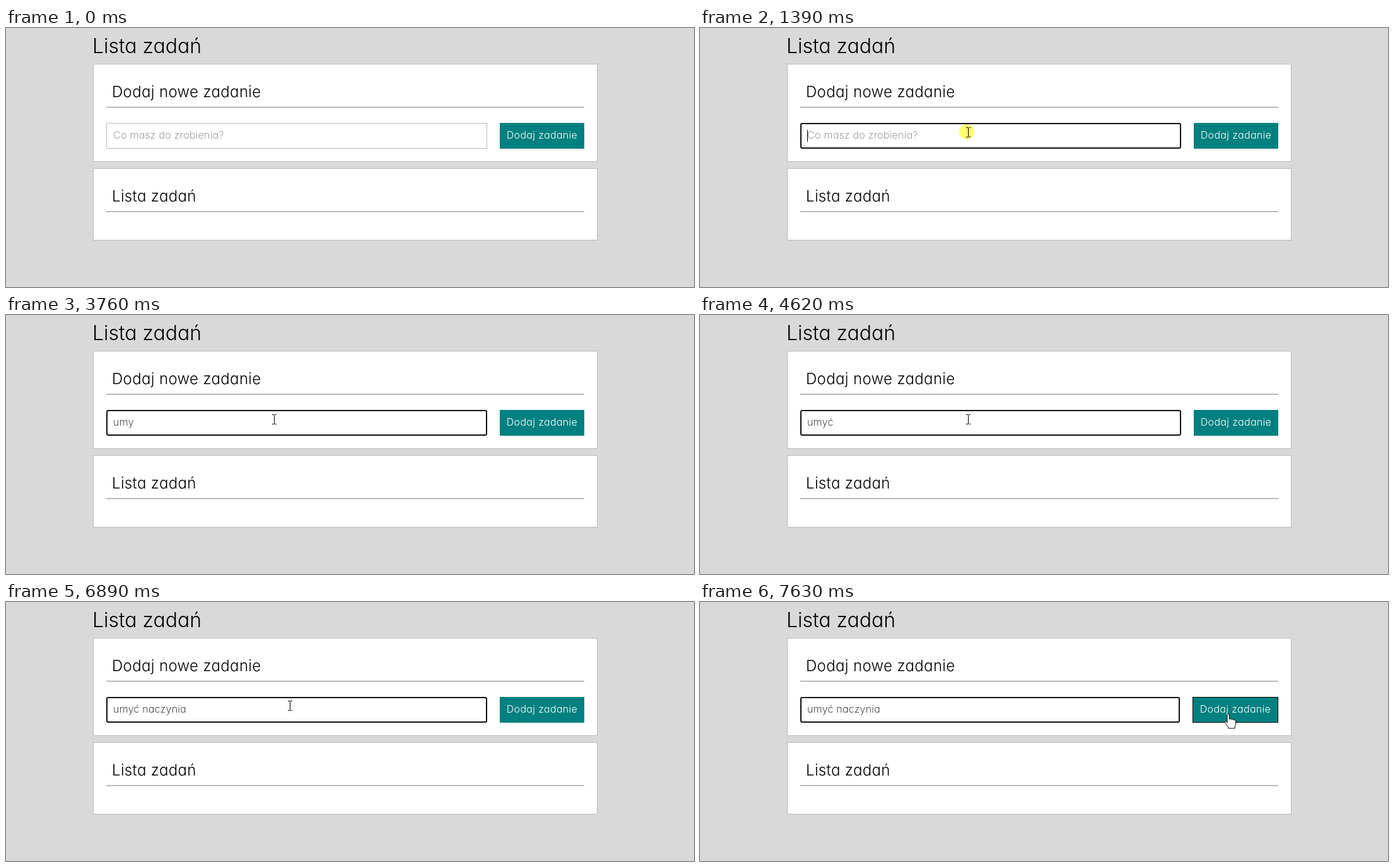
Write an HTML page that moves like this. It is 1091 px wide and 412 px high and loops after 8000 ms.

```html
<!DOCTYPE html>
<html lang="pl">
<head>
<meta charset="utf-8">
<title>Lista zadań</title>
<style>
  html, body { margin: 0; width: 100%; height: 100%; overflow: hidden; background: #d9d9d9; }
  svg { display: block; }
  text {
    font-family: Inter, "Open Sans", sans-serif;
    font-weight: 300;
    font-feature-settings: "cv11";
    font-optical-sizing: none;
    white-space: pre;
  }
  .title { font-size: 32px; }
  .heading { font-size: 24px; letter-spacing: .015em; }
  .label { font-size: 16px; letter-spacing: .02em; }
  .thin { font-weight: 200; }
  .card { fill: #fff; stroke: #bbb; }
  .rule { fill: #bbb; }
  .pointer { fill: #fff; stroke: #000; stroke-linejoin: round; }
</style>
</head>
<body>
<svg width="1091" height="412" viewBox="0 0 1091 412">
  <text class="title" x="137" y="40">Lista zadań</text>

  <rect class="card" x="138.5" y="57.5" width="799" height="155"/>
  <text class="heading" x="168" y="110">Dodaj nowe zadanie</text>
  <rect class="rule" x="159" y="125" width="758" height="2"/>

  <rect class="card" x="138.5" y="223.5" width="799" height="114"/>
  <text class="heading" x="168" y="276">Lista zadań</text>
  <rect class="rule" x="159" y="291" width="758" height="2"/>

  <rect id="field" fill="#fff"/>
  <circle id="click" cx="423" cy="165" r="12" fill="#ffff70"/>
  <text id="hint" class="label thin" x="170" y="176" fill="#757575">Co masz do zrobienia?</text>
  <text id="entry" class="label thin" x="170" y="176"></text>
  <rect id="caret" y="162" width="1" height="19"/>

  <rect id="button" y="151.5" height="40" fill="#008080"/>
  <text id="caption" class="label" y="176" fill="#fff" text-anchor="middle">Dodaj zadanie</text>

  <g id="cursor">
    <path id="arrow" class="pointer" d="M.5 .5V16.5L4 13L6.700 19L9 18L6.400 12.100H11.500Z"/>
    <path id="beam" fill="none" stroke="#000" transform="translate(.5 0)"
      d="M-3.500-7.500h3M.5-7.500h3M0-7V7M-3.500 7.500h3M.5 7.500h3"/>
    <path id="hand" class="pointer"
      d="M-2 14V2a1.700 1.700 0 0 1 3.400 0V8.500C2 7.500 4.500 7.600 5 9C6.300 8.100 8.200 8.600 8.600 9.900C10 9.200 11.500 10 11.500 11.500V16C11.500 18 10 19.500 10 21V23H0V21.500C-1.500 19.500-5 15.500-5.500 13.500C-5.600 11.500-3.500 11.500-2 14Z"/>
  </g>
</svg>
<script>
const LOOP = 8000, FOCUS = 1390, BLINK = 520, STEPS = 11;
const PHRASE = "umyć naczynia";
const KEYS = [2570, 2900, 3230, 3890, 4090, 4760, 4820, 5090, 5150, 5420, 5680, 5750, 5950];

const ui = {};
for (const el of document.querySelectorAll("[id]")) ui[el.id] = el;

const show = (el, on) => el.style.display = on ? "" : "none";
const set = (el, attrs) => {
  for (const name in attrs) el.setAttribute(name, attrs[name]);
};
const mix = (a, b, k) => a.map((v, i) => Math.round(v + (b[i] - v) * k));
const easeOut = u => 1 - (1 - u) ** 2;
const glide = u => (u + u * u * (3 - 2 * u)) / 2;

// The pointer was sampled in discrete steps.
const stepAt = (t, from, to) =>
  Math.min(STEPS, Math.floor((t - from) / (to - from) * STEPS + .15));

function pointerAt(t) {
  const entry = [946, 400], below = [429, 202], rest = [425, 166];
  if (t < 200) return null;
  if (t < 6890) {
    const n = stepAt(t, 200, 930);
    return n < 7 ? mix(entry, below, easeOut(n / 7))
                 : mix(below, rest, easeOut((n - 7) / 4));
  }
  return mix([450, 165], [838, 178], glide(stepAt(t, 6890, 7630) / STEPS));
}

function draw(t) {
  const pos = pointerAt(t);
  const inRow = pos && pos[1] >= 151 && pos[1] < 192;
  const onButton = inRow && pos[0] >= 781 && pos[0] < 917;
  const onField = inRow && pos[0] >= 159 && pos[0] < 763;
  const focused = t >= FOCUS;
  const right = onButton ? 761 : 763;

  const line = focused ? 2 : 1;
  set(ui.field, {
    x: 159 + line / 2, y: 151 + line / 2,
    width: right - 159 - line, height: 41 - line,
    rx: focused ? 2 : 0, "stroke-width": line,
    stroke: focused ? "#101010" : onField ? "#000" : "#bbb"
  });

  const typed = KEYS.filter(k => k <= t).length;
  ui.entry.textContent = PHRASE.slice(0, typed);
  show(ui.hint, !typed);

  const since = t - (typed ? KEYS[typed - 1] : FOCUS);
  show(ui.caret, focused && Math.floor(since / BLINK) % 2 === 0);
  const width = typed ? ui.entry.getComputedTextLength() : 0;
  set(ui.caret, { x: 170 + Math.round(width) });

  set(ui.button, {
    x: right + 20.5, width: 916 - right - 20,
    stroke: onButton ? "#000" : "#008080"
  });
  set(ui.caption, { x: onButton ? 849 : 850 });

  show(ui.click, t >= FOCUS && t < 1450);
  show(ui.cursor, pos);
  if (!pos) return;
  set(ui.cursor, { transform: `translate(${pos})` });
  show(ui.beam, onField);
  show(ui.hand, onButton);
  show(ui.arrow, !onField && !onButton);
}

const start = performance.now();
function tick() {
  draw((performance.now() - start) % LOOP);
  requestAnimationFrame(tick);
}
tick();
</script>
</body>
</html>
```
